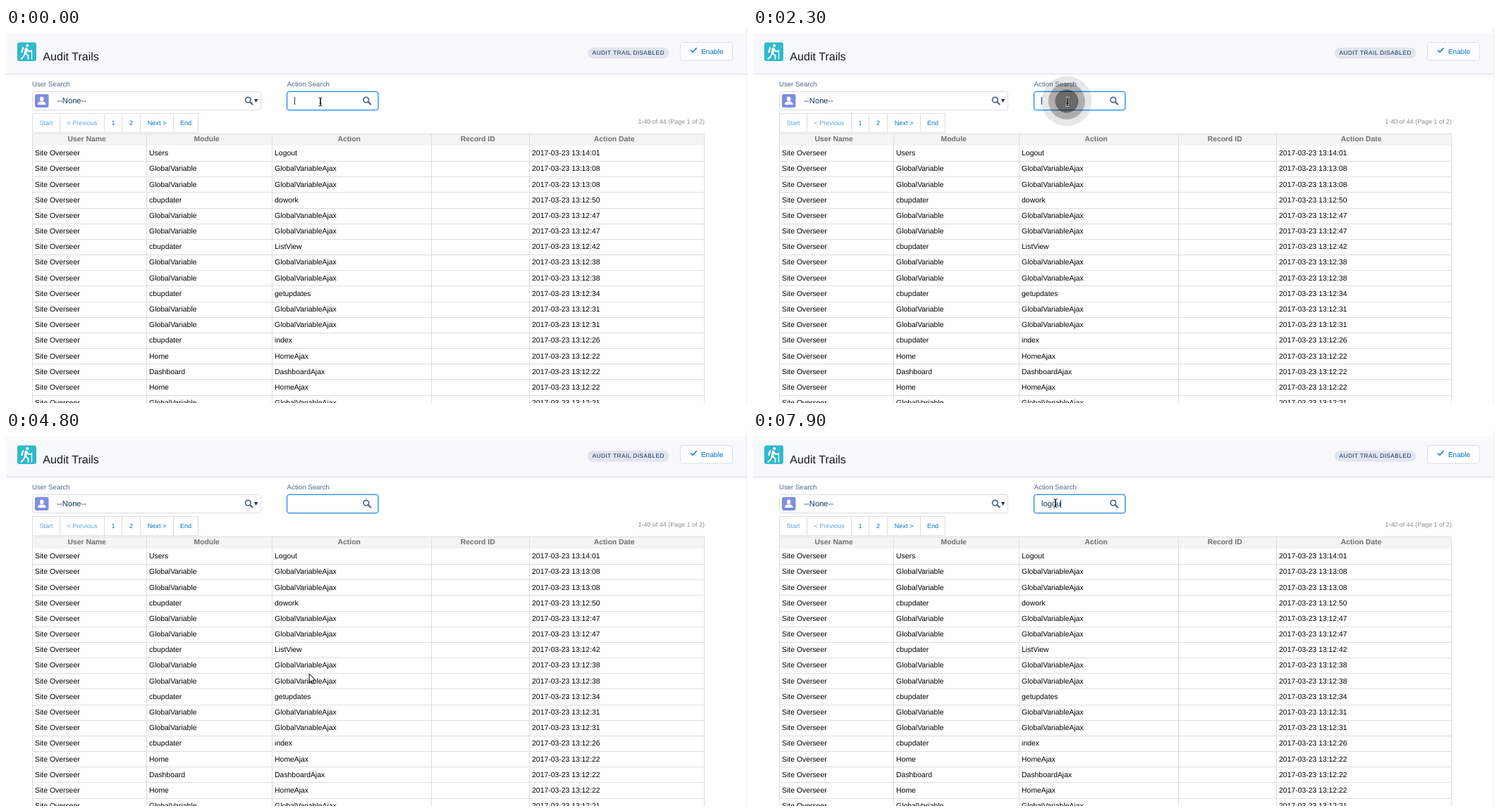
An HTML page for the animation above (8 s loop, 1051 by 533 pixels).

```html
<!DOCTYPE html>
<html lang="en">
<head>
<meta charset="utf-8">
<title>Audit Trails</title>
<style>
  html, body { margin: 0; height: 100%; overflow: hidden; background: #fff; }
  svg { display: block; width: 1051px; height: 533px; }
  text { font-family: "Liberation Sans", Arial, sans-serif; text-rendering: geometricPrecision; white-space: pre; }
</style>
</head>
<body>
<svg id="stage" viewBox="0 0 1051 533">
  <defs>
    <filter id="glow" x="-10%" y="-30%" width="120%" height="160%"><feGaussianBlur stdDeviation="1.2"/></filter>
    <g id="lens" fill="none" stroke="#54698d">
      <circle cx="-1.2" cy="-1.2" r="3.8" stroke-width="1.7"/>
      <path d="M1.8 1.8L5.2 5.2" stroke-width="2.2" stroke-linecap="round"/>
    </g>
    <path id="beamShape" d="M-2.5-6Q0-6 0-4.5V4.5Q0 6-2.5 6M2.5-6Q0-6 0-4.5V4.5Q0 6 2.5 6M-1.3 2H1.3"/>
  </defs>

  <path d="M0 7.5H1051V65H0Z" fill="#f7f9fb"/>
  <path d="M0 65.5H1051" stroke="#d8dde6"/>
  <path d="M1050.5 0V533" stroke="#ececee"/>

  <rect x="16" y="20.5" width="27" height="26.5" rx="3" fill="#31b9cc"/>
  <g fill="none" stroke="#fff" stroke-linecap="round" stroke-linejoin="round">
    <circle cx="30.3" cy="25" r="2.1" fill="#fff" stroke="none"/>
    <path d="M28.5 29.5L27.5 36" stroke-width="3.6"/>
    <path d="M27.5 36L31.5 39V44M26.5 37L25 40.5L21.5 44M30 30L32 33H35.5" stroke-width="1.8"/>
    <path d="M24 28.5L22.6 34" stroke-width="2.4"/>
    <path d="M36.5 31V44" stroke-width="1.2"/>
  </g>

  <rect x="825" y="28" width="115.5" height="15.5" rx="7.75" fill="#e0e5ee"/>
  <rect x="956.5" y="20.5" width="74" height="25.5" rx="3.2" fill="#fff" stroke="#d8dde6"/>
  <path d="M971.3 31.6L974.2 34.3L979.6 28.2" fill="none" stroke="#0070d2" stroke-width="1.5"/>

  <rect x="37.5" y="90.5" width="324" height="26" rx="3.2" fill="#fff" stroke="#d8dde6"/>
  <rect x="41" y="94" width="19.5" height="19" rx="2.4" fill="#7f8de1"/>
  <g fill="#fff">
    <ellipse cx="50.7" cy="100.8" rx="2.8" ry="3.3"/>
    <path d="M45 109V107.4Q45.4 105.4 48.8 104.6H52.6Q56 105.4 56.4 107.4V109Z"/>
  </g>
  <use href="#lens" x="344.5" y="103.3"/>
  <path d="M352 101H357.2L354.6 106Z" fill="#16325c"/>

  <rect x="398.5" y="90.5" width="129.5" height="26" rx="3.5" fill="#0070d2" filter="url(#glow)"/>
  <rect x="398.8" y="90.5" width="129" height="26" rx="3.2" fill="#fff" stroke="#1589ee"/>
  <use href="#lens" x="512" y="103.3"/>

  <g id="page"></g>
  <text id="typed" x="409" y="107" font-size="11.2" fill="#16325c"></text>
  <rect id="caret" y="98" width="1" height="11" fill="#16325c"/>
  <g id="ripples"></g>
  <g id="beam" fill="none">
    <use href="#beamShape" stroke="#fff" stroke-width="2.4"/>
    <use href="#beamShape" stroke="#000"/>
  </g>
  <path id="arrow" d="M.5 .5V13L3.4 10.3L5.4 14.8L7.4 13.9L5.4 9.5H9.3Z" fill="#fff" stroke="#000"/>
</svg>
<script>
const $ = id => document.getElementById(id);

function add(parent, tag, attrs, content = '') {
  const el = document.createElementNS('http://www.w3.org/2000/svg', tag);
  for (const key in attrs) el.setAttribute(key, attrs[key]);
  el.textContent = content;
  return parent.appendChild(el);
}
const label = (content, x, y, size, fill, more) =>
  add($('page'), 'text', { x, y, 'font-size': size, fill, ...more }, content);
const line = d => add($('page'), 'path', { d, stroke: '#dddddd', fill: 'none' });
const centered = { 'text-anchor': 'middle' };

// Header and search fields
label('Audit Trails', 52.3, 45.5, 16.1, '#16181c');
label('AUDIT TRAIL DISABLED', 831.5, 38.3, 8.4, '#16325c', { 'letter-spacing': 0.4 });
label('Enable', 985.9, 36.6, 10.1, '#0070d2');
label('User Search', 36.9, 83, 9.7, '#54698d');
label('Action Search', 398.6, 83, 9.7, '#54698d');
label('--None--', 72.4, 106.8, 11.2, '#16325c');

// Pagination
const edges = [37.5, 76.5, 139.5, 164.5, 190.5, 237.5, 272.5];
['Start', '< Previous', '1', '2', 'Next >', 'End'].forEach((name, i) =>
  label(name, (edges[i] + edges[i + 1]) / 2, 137.5, 9.1, i < 2 ? '#5fa6e2' : '#0070d2', centered));
line('M37.5 121.5H272.5V148.5H37.5Z' + edges.map(x => `M${x} 121.5V148.5`).join(''));
label('1-40 of 44 (Page 1 of 2)', 991, 136, 8.96, '#8c8b80', { 'text-anchor': 'end' });

// Table
const columns = [37.5, 199.5, 377.5, 603.5, 742.5, 990.5], pitch = 22.17;
add($('page'), 'rect', { x: 37, y: 150, width: 954, height: 17, fill: '#f4f4f4' });
['User Name', 'Module', 'Action', 'Record ID', 'Action Date'].forEach((name, i) =>
  label(name, (columns[i] + columns[i + 1]) / 2 - 3.8, 161.2, 10.4, '#6f7073', { ...centered, 'font-weight': 'bold' }));
line('M37 150.5H991' + columns.map(x => `M${x} 150V533`).join(''));

const G = 'GlobalVariable';
[
  ['Users', 'Logout', '14:01'], [G, G + 'Ajax', '13:08'], [G, G + 'Ajax', '13:08'],
  ['cbupdater', 'dowork', '12:50'], [G, G + 'Ajax', '12:47'], [G, G + 'Ajax', '12:47'],
  ['cbupdater', 'ListView', '12:42'], [G, G + 'Ajax', '12:38'], [G, G + 'Ajax', '12:38'],
  ['cbupdater', 'getupdates', '12:34'], [G, G + 'Ajax', '12:31'], [G, G + 'Ajax', '12:31'],
  ['cbupdater', 'index', '12:26'], ['Home', 'HomeAjax', '12:22'],
  ['Dashboard', 'DashboardAjax', '12:22'], ['Home', 'HomeAjax', '12:22'], [G, G + 'Ajax', '12:21'],
].forEach(([module, action, time], i) => {
  const y = 181.3 + i * pitch;
  ['Site Overseer', module, action, '', '2017-03-23 13:' + time].forEach((cell, c) =>
    label(cell, columns[c] + 3.6, y, 10.4, '#000'));
  line(`M37 ${Math.round(189 + i * pitch) + 0.5}H991`);
});

// Animation
const LOOP = 8000, STEP = 100;
const caretFlips = [300, 900, 1500, 2100, 4100, 5000, 5600, 6200, 6900, 7200];
const keyTimes = [7200, 7400, 7600, 7800, 7900];
const path = [
  [0, 446, 105], [4100, 446, 105], [4500, 429, 447], [4600, 429, 447], [5100, 431, 156],
  [5200, 431, 156], [5400, 430, 92], [5600, 430, 92], [5700, 429, 103], [5800, 429, 103],
  [5900, 429, 104], [6000, 429, 102.5], [LOOP, 429, 102.5],
];
const RIPPLE_LIFE = 425;
const ripples = [0, 1, 2, 3].map(i =>
  ({ start: 1770 + 112 * i, el: add($('ripples'), 'circle', { cx: 445, cy: 104 }) }));

const passed = (times, t) => times.filter(time => time <= t).length;

function pointerAt(t) {
  const i = path.findIndex(p => p[0] > t);
  const [t0, x0, y0] = path[i - 1], [t1, x1, y1] = path[i];
  const u = (t - t0) / (t1 - t0), k = u * u * (3 - 2 * u);
  return [x0 + (x1 - x0) * k, y0 + (y1 - y0) * k];
}

function draw(now) {
  const t = Math.floor(now % LOOP / STEP) * STEP;

  $('typed').textContent = 'logou'.slice(0, passed(keyTimes, t));
  $('caret').setAttribute('x', Math.round(409 + $('typed').getComputedTextLength()));
  $('caret').setAttribute('opacity', passed(caretFlips, t) % 2 ? 0 : 1);

  // The last ripple lingers until the pointer moves on.
  const rippleTime = t < 4100 ? Math.min(t, 2500) : t;
  for (const { start, el } of ripples) {
    const age = rippleTime - start;
    const alive = t >= 1900 && age > 0 && age < RIPPLE_LIFE;
    el.setAttribute('r', alive ? age * 0.085 : 0);
    el.setAttribute('opacity', alive ? 0.66 - age * 0.00135 : 0);
  }

  const isArrow = t >= 4200 && t < 5700;
  const move = `translate(${pointerAt(t)})`;
  $('arrow').setAttribute('transform', move);
  $('beam').setAttribute('transform', move);
  $('arrow').setAttribute('opacity', isArrow ? 1 : 0);
  $('beam').setAttribute('opacity', isArrow ? 0 : 1);
  requestAnimationFrame(draw);
}
requestAnimationFrame(draw);
</script>
</body>
</html>
```
